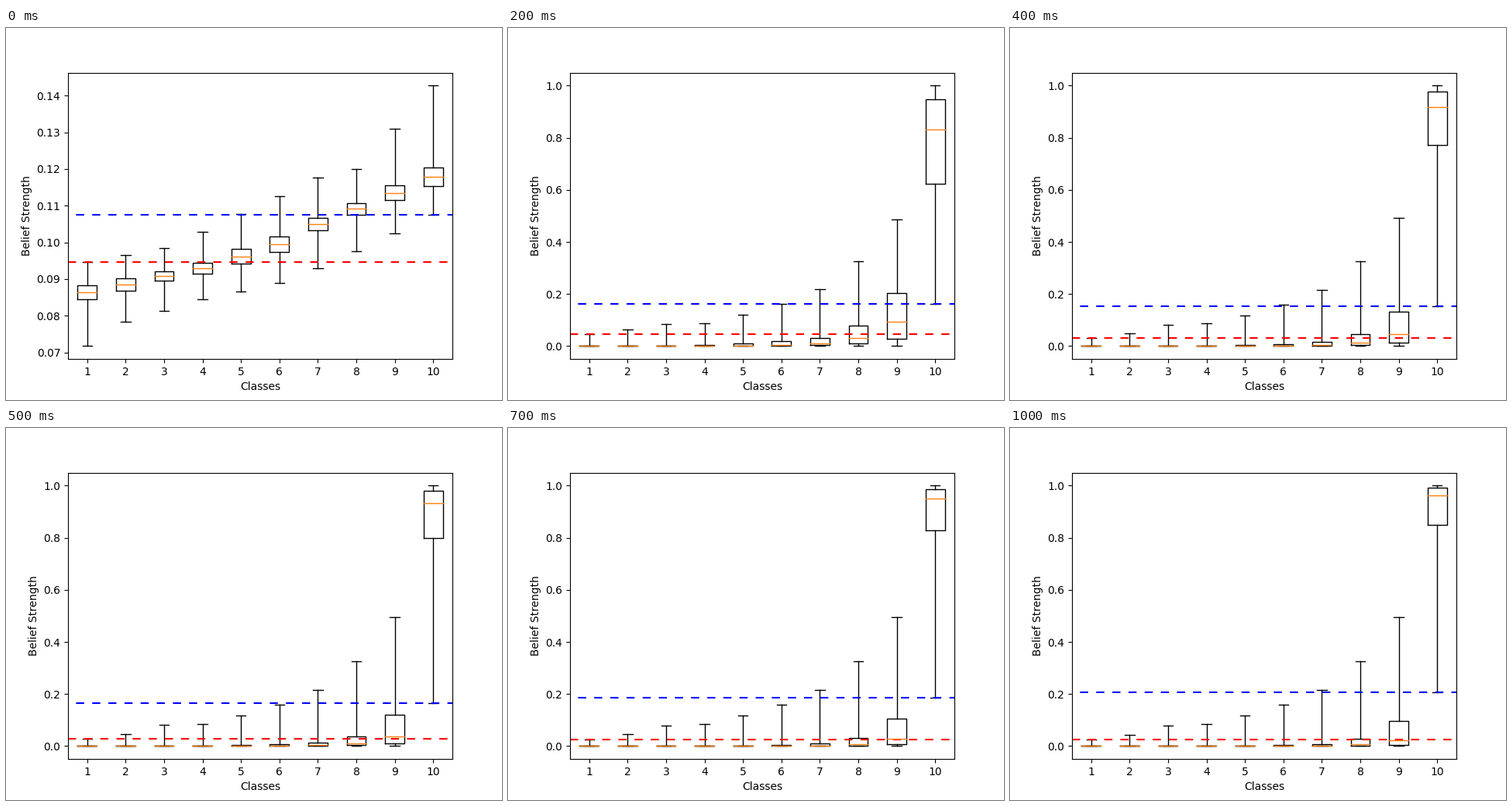
Animation, 640 px wide and 480 px high, one loop 1100 ms. Source, as a matplotlib script:

```python
import numpy as np
import matplotlib.pyplot as plt
from matplotlib.animation import FuncAnimation

STEPS = 11
CLS = np.arange(1, 11)
ORANGE = dict(color="C1", solid_capstyle="projecting")


def curve(*keys):
    """Geometric interpolation across the classes through (class, value)."""
    x, y = zip(*keys)
    return np.exp(np.interp(CLS, x, np.log(y)))


def uniform_start():
    med = curve((1, .0864), (4, .0930), (6, .0995), (7, .1050), (10, .1179))
    half = med * (.018 + .004 * np.cos(2 * np.pi * (CLS - 1) / 4.6))
    lo = curve((1, .07172), (2, .0783), (4, .0845), (6, .0889), (7, .0930),
               (10, .1075))
    hi = curve((1, .0946), (3, .0984), (7, .1177), (8, .1200), (10, .1427))
    return lo, med - half, med, med + half, hi


def first_spread():
    med = curve((1, .006), (2, .0125), (8, .106), (9, .168), (10, .451))
    lo = curve((6, 1e-4), (8, .004), (9, .010), (10, .121))
    q3 = curve((1, .009), (2, .021), (7, .095), (9, .221), (10, .639))
    hi = curve((1, .074), (5, .130), (7, .200), (8, .308), (9, .437),
               (10, .9825))
    return lo, med * (.42 + .03 * CLS), med, q3, hi


# Quartiles and upper whiskers: where settling begins, and its limit
BEGIN = np.array([
    curve((5, 1e-4), (7, .003), (9, .028), (10, .623)),
    curve((3, 2e-4), (7, .010), (9, .094), (10, .831)),
    curve((2, 5e-4), (5, .010), (7, .031), (9, .204), (10, .947)),
    curve((1, .046), (3, .085), (4, .088), (7, .218), (9, .486), (10, 1)),
])
LIMIT = np.array([
    curve((8, 3e-4), (9, .001), (10, .887)),
    curve((7, 4e-4), (9, .0086), (10, .985)),
    curve((4, 2e-4), (7, .004), (9, .077), (10, .999)),
    curve((1, .020), (3, .078), (4, .085), (7, .214), (9, .498), (10, 1)),
])


def settling(step):
    rest = (2 / step) ** 1.2
    lo = np.zeros(CLS.size)
    lo[-1] = np.interp(step, (2, 4, 8, 10), (.162, .153, .195, .207))
    return lo, *(LIMIT + (BEGIN - LIMIT) * rest)


def stats_at(step):
    if step == 0:
        parts = uniform_start()
    elif step == 1:
        parts = first_spread()
    else:
        parts = settling(step)
    names = ("whislo", "q1", "med", "q3", "whishi")
    return [dict(zip(names, vals), label=str(c))
            for c, vals in zip(CLS, np.transpose(parts))]


def draw(step):
    ax.clear()
    stats = stats_at(step)
    ax.bxp(stats, widths=0.5, showfliers=False, medianprops=ORANGE)
    ax.axhline(stats[0]["whishi"], color="red", lw=1.5, ls=(0, (5, 5)))
    ax.axhline(stats[-1]["whislo"], color="blue", lw=1.5, ls=(5, (5, 5)))
    ax.set_xlabel("Classes")
    ax.set_ylabel("Belief Strength")
    return []


fig, ax = plt.subplots(figsize=(6.4, 4.8), dpi=100)
anim = FuncAnimation(fig, draw, frames=STEPS, init_func=lambda: draw(0),
                     interval=100, repeat=True, repeat_delay=0)
plt.show()
```
